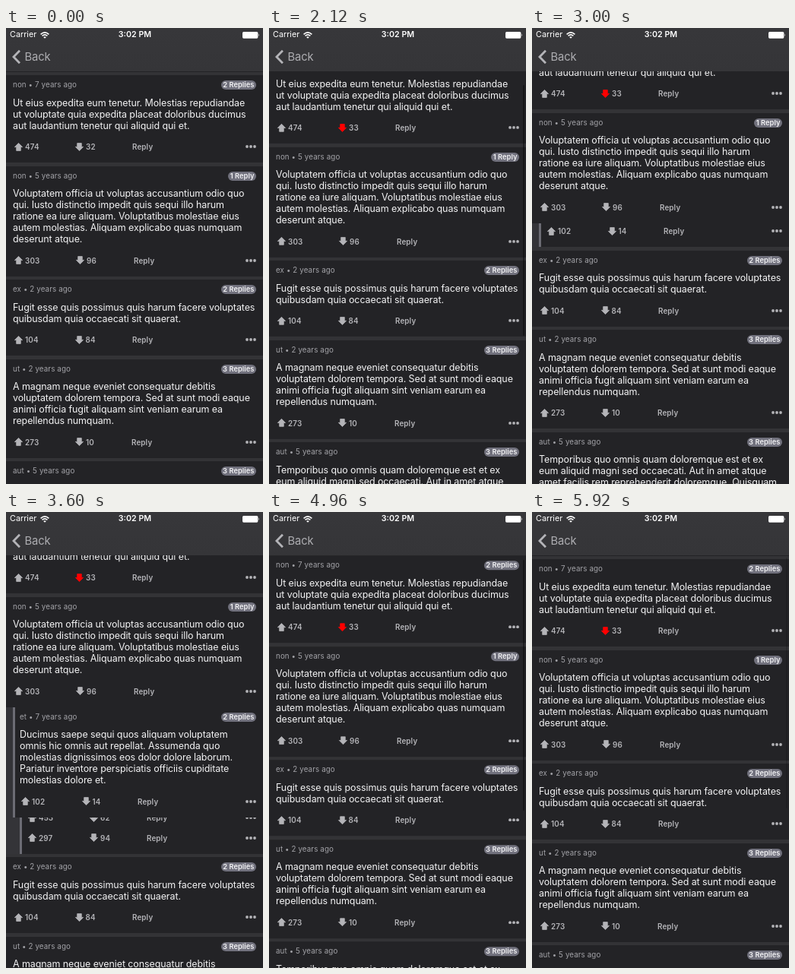
An HTML page for the animation above (6 s loop, 338 by 600 pixels).

```html
<!DOCTYPE html>
<html lang="la">
<head>
<meta charset="utf-8">
<title>Comment thread</title>
<style>
@property --scroll { syntax: "<number>"; inherits: true; initial-value: 0; }

html, body { margin: 0; width: 100%; height: 100%; overflow: hidden; background: #232326; }
#stage {
  position: relative; width: 338px; height: 600px; overflow: hidden;
  background: #232326; color: #f2f2f3;
  font-family: Inter, Roboto, "Liberation Sans", sans-serif;
  animation: scroll 6s infinite;
}
#stage * { box-sizing: border-box; white-space: nowrap; }
svg { position: absolute; overflow: visible; }

/* Bars */
nav {
  position: absolute; inset: 0 0 auto; height: 57px;
  background: linear-gradient(#37373a, #353538);
}
nav span { position: absolute; line-height: 14px; }
.carrier { left: 5px; top: 2px; font-size: 10.8px; color: #fff; }
.clock { left: 0; width: 339px; top: 2px; text-align: center; font-size: 10.7px; font-weight: 600; color: #fff; }
nav .back { left: 24.5px; top: 28px; line-height: 20px; font-size: 14.8px; letter-spacing: -.15px; color: #adadb1; }

/* Thread */
#list { position: absolute; left: 0; top: 57.75px; width: 338px; transform: translateY(calc(var(--scroll) * -1px)); }
.gap { height: 4.5px; background: #333336; }
.cell { position: relative; height: var(--h); overflow: hidden; }
.body { position: absolute; left: 0; bottom: 0; width: 338px; height: var(--h); }
.body > * { position: absolute; }
.rail { left: 0; top: 0; bottom: 0; background: #343438; border-right: 3px solid #6c6c74; }
.meta { top: 7px; line-height: 12px; font-size: 9.8px; letter-spacing: .1px; color: #a2a2a7; }
.badge {
  right: 9px; top: 7px; height: 12px; padding: 0 2.5px; border-radius: 6px;
  line-height: 12px; font-size: 9.3px; font-weight: 600; letter-spacing: .05px;
  background: #71717d; color: #f2f2f4;
}
.text { top: 28.5px; line-height: 15px; font-size: 12.5px; letter-spacing: -.1px; }
.act { bottom: 14px; height: 14px; line-height: 14px; font-size: 9.9px; font-weight: 600; letter-spacing: .1px; color: #b4b4b8; }
.act span { position: absolute; left: 0; top: 0; }
.arrow { bottom: 15.5px; width: 11px; height: 11px; fill: #b4b4b8; stroke: #b4b4b8; stroke-width: .8; stroke-linejoin: round; }
.down { transform: scaleY(-1); }
.dots { bottom: 19px; left: 314.5px; width: 14px; height: 4px; fill: #b4b4b8; }

/* Votes on the first post */
.voted .up { animation: upTint 6s step-end infinite; }
.voted .down { animation: downTint 6s step-end infinite; }
.upOff { animation: upOff 6s step-end infinite; }
.upOn { animation: upOn 6s step-end infinite; }
.downOff { animation: downOff 6s step-end infinite; }
.downOn { animation: downOn 6s step-end infinite; }
@keyframes upTint { 9.333% { fill: #0f0; stroke: #0f0; } 20% { fill: #b4b4b8; stroke: #b4b4b8; } }
@keyframes downTint { 20%, 100% { fill: #f00; stroke: #f00; } }
@keyframes upOff { 0% { opacity: 1; } 9.333% { opacity: 0; } 20%, 100% { opacity: 1; } }
@keyframes upOn { 0% { opacity: 0; } 9.333% { opacity: 1; } 20%, 100% { opacity: 0; } }
@keyframes downOff { 0% { opacity: 1; } 20%, 100% { opacity: 0; } }
@keyframes downOn { 0% { opacity: 0; } 20%, 100% { opacity: 1; } }

/* Replies unfold and fold, anchored to their lower edge */
.reply { animation: 6s cubic-bezier(.333, 0, .667, 1) infinite; }
.reply1 { animation-name: fold1; }
.reply2 { animation-name: fold2; }
.reply3 { animation-name: fold3; }
@keyframes fold1 { 0%, 47.725% { height: 0; } 55.333%, 70.083% { height: var(--h); } 78.083%, 100% { height: 0; } }
@keyframes fold2 { 0%, 58% { height: 0; } 65.333%, 69.883% { height: var(--h); } 77.883%, 100% { height: 0; } }
@keyframes fold3 { 0%, 58% { height: 0; } 65.333%, 70.4% { height: var(--h); } 78.4%, 100% { height: 0; } }

@keyframes scroll {
  0% { --scroll: 0; }
  25.333% { --scroll: 0; animation-timing-function: cubic-bezier(.4, .1, .75, .65); }
  35.333% { --scroll: 25; animation-timing-function: cubic-bezier(.3, .45, .5, 1); }
  46% { --scroll: 70; }
  78.667% { --scroll: 70; animation-timing-function: cubic-bezier(.4, .1, .7, .8); }
  82.667% { --scroll: 5; animation-timing-function: cubic-bezier(.2, .6, .5, 1); }
  88% { --scroll: -12; animation-timing-function: linear; }
  88.667% { --scroll: -13; }
  90% { --scroll: -13; animation-timing-function: cubic-bezier(.2, .6, .3, 1); }
  98.667%, 100% { --scroll: 0; }
}

#thumb {
  position: absolute; left: 333.5px; top: 60px; width: 2.5px; border-radius: 2px;
  height: calc(330px + min(var(--scroll), 0) * 1px);
  transform: translateY(calc(max(var(--scroll), 0) * .6px));
  background: rgba(0, 0, 0, .4);
  animation: thumb 6s linear infinite;
}
@keyframes thumb {
  0%, 25.333% { opacity: 0; }
  27%, 46% { opacity: 1; }
  49%, 78.667% { opacity: 0; }
  80%, 97% { opacity: 1; }
  99.5%, 100% { opacity: 0; }
}
</style>
</head>
<body>
<div id="stage">
  <div id="list"></div>
  <div id="thumb"></div>
  <nav>
    <span class="carrier">Carrier</span>
    <svg style="left:45px;top:4.5px" width="12" height="9" fill="none" stroke="#fff" stroke-width="1.6">
      <path d="M.6 3.3Q6-1.4 11.4 3.3M2.6 5.4Q6 2.4 9.4 5.4"/>
      <path d="M6 8.8 4.1 6.9Q6 5.4 7.9 6.9Z" fill="#fff" stroke="none"/>
    </svg>
    <span class="clock">3:02 PM</span>
    <svg style="left:310.5px;top:4.8px" width="23" height="9" fill="#fff">
      <rect width="20.4" height="8.7" rx="1.6"/><path d="M21 2.8Q22.5 4.3 21 5.8Z"/>
    </svg>
    <svg style="left:8px;top:29px" width="11" height="18" fill="none" stroke="#b4b4b8" stroke-width="2.8">
      <path d="M10 .8 2 9 10 17.2"/>
    </svg>
    <span class="back">Back</span>
  </nav>
</div>
<script>
// votes: up count, down count; cols: left edge of the down arrow and of "Reply"
const posts = [
  { meta: "non • 7 years ago", replies: 2, votes: [474, 32], cols: [91, 166], voted: true, text: [
    "Ut eius expedita eum tenetur. Molestias repudiandae",
    "ut voluptate quia expedita placeat doloribus ducimus",
    "aut laudantium tenetur qui aliquid qui et."] },
  { meta: "non • 5 years ago", replies: 1, votes: [303, 96], cols: [92, 168], text: [
    "Voluptatem officia ut voluptas accusantium odio quo",
    "qui. Iusto distinctio impedit quis sequi illo harum",
    "ratione ea iure aliquam. Voluptatibus molestiae eius",
    "autem molestias. Aliquam explicabo quas numquam",
    "deserunt atque."] },
  { level: 1, meta: "et • 7 years ago", replies: 2, votes: [102, 14], cols: [99.5, 173], text: [
    "Ducimus saepe sequi quos aliquam voluptatem",
    "omnis hic omnis aut repellat. Assumenda quo",
    "molestias dignissimos eos dolor dolore laborum.",
    "Pariatur inventore perspiciatis officiis cupiditate",
    "molestias dolore et."] },
  { level: 2, meta: "quo • 3 years ago", replies: 1, votes: [453, 62], cols: [110, 185], text: [
    "Dolorem sit odio consequatur omnis consectetur",
    "repudiandae. Ducimus dolorum minima quia qui sint",
    "voluptatem facere quia maiores."] },
  { level: 2, meta: "nobis • 5 years ago", replies: 1, votes: [297, 94], cols: [110, 185], text: [
    "Molestias molestias dicta voluptas corporis",
    "perferendis ducimus est inventore harum. Dolorem",
    "quisquam possimus sit aspernatur qui unde",
    "voluptatibus ea consectetur cupiditate magnam",
    "debitis. Harum ut mollitia qui."] },
  { meta: "ex • 2 years ago", replies: 2, votes: [104, 84], cols: [90.5, 166], text: [
    "Fugit esse quis possimus quis harum facere voluptates",
    "quibusdam quia occaecati sit quaerat."] },
  { meta: "ut • 2 years ago", replies: 3, votes: [273, 10], cols: [91, 165], text: [
    "A magnam neque eveniet consequatur debitis",
    "voluptatem dolorem tempora. Sed at sunt modi eaque",
    "animi officia fugit aliquam sint veniam earum ea",
    "repellendus numquam."] },
  { meta: "aut • 5 years ago", replies: 3, votes: [186, 41], cols: [91, 166], text: [
    "Temporibus quo omnis quam doloremque est et ex",
    "eum aliquid magni sed occaecati. Aut in amet atque",
    "amet facilis rem reprehenderit doloremque. Quisquam",
    "sit nulla dolores et quia voluptas ut eveniet.",
    "Rerum quod omnis."] },
];

const at = x => `style="left:${x}px"`;
const arrow = (dir, x) =>
  `<svg class="arrow ${dir}" ${at(x)}><path d="M5.5.4 10.6 5.6H8.3V10.4H2.7V5.6H.4Z"/></svg>`;
const count = (dir, n, x, voted) => `<div class="act" ${at(x)}>` + (voted
  ? `<span class="${dir}Off">${n}</span><span class="${dir}On">${n + 1}</span>`
  : n) + "</div>";

let replyNo = 0;
function cell({ level = 0, meta, replies, votes, cols, text, voted }) {
  const dx = level * 9, left = 9 + dx;
  const kind = level ? `reply reply${++replyNo}` : "";
  return `${level ? "" : '<div class="gap"></div>'}
    <div class="cell ${kind}" style="--h:${70 + 15 * text.length}px">
      <div class="body ${voted ? "voted" : ""}">
        ${level ? `<div class="rail" style="width:${dx + 3}px"></div>` : ""}
        <div class="meta" ${at(left)}>${meta}</div>
        <div class="badge">${replies} ${replies > 1 ? "Replies" : "Reply"}</div>
        <div class="text" ${at(left)}>${text.join("<br>")}</div>
        ${arrow("up", 11 + dx)}${count("up", votes[0], 25 + dx, voted)}
        ${arrow("down", cols[0])}${count("down", votes[1], cols[0] + 14, voted)}
        <div class="act" ${at(cols[1])}>Reply</div>
        <svg class="dots"><circle cx="2" cy="2" r="1.9"/><circle cx="7" cy="2" r="1.9"/><circle cx="12" cy="2" r="1.9"/></svg>
      </div>
    </div>`;
}

document.getElementById("list").innerHTML = posts.map(cell).join("") + '<div class="gap"></div>';
</script>
</body>
</html>
```
